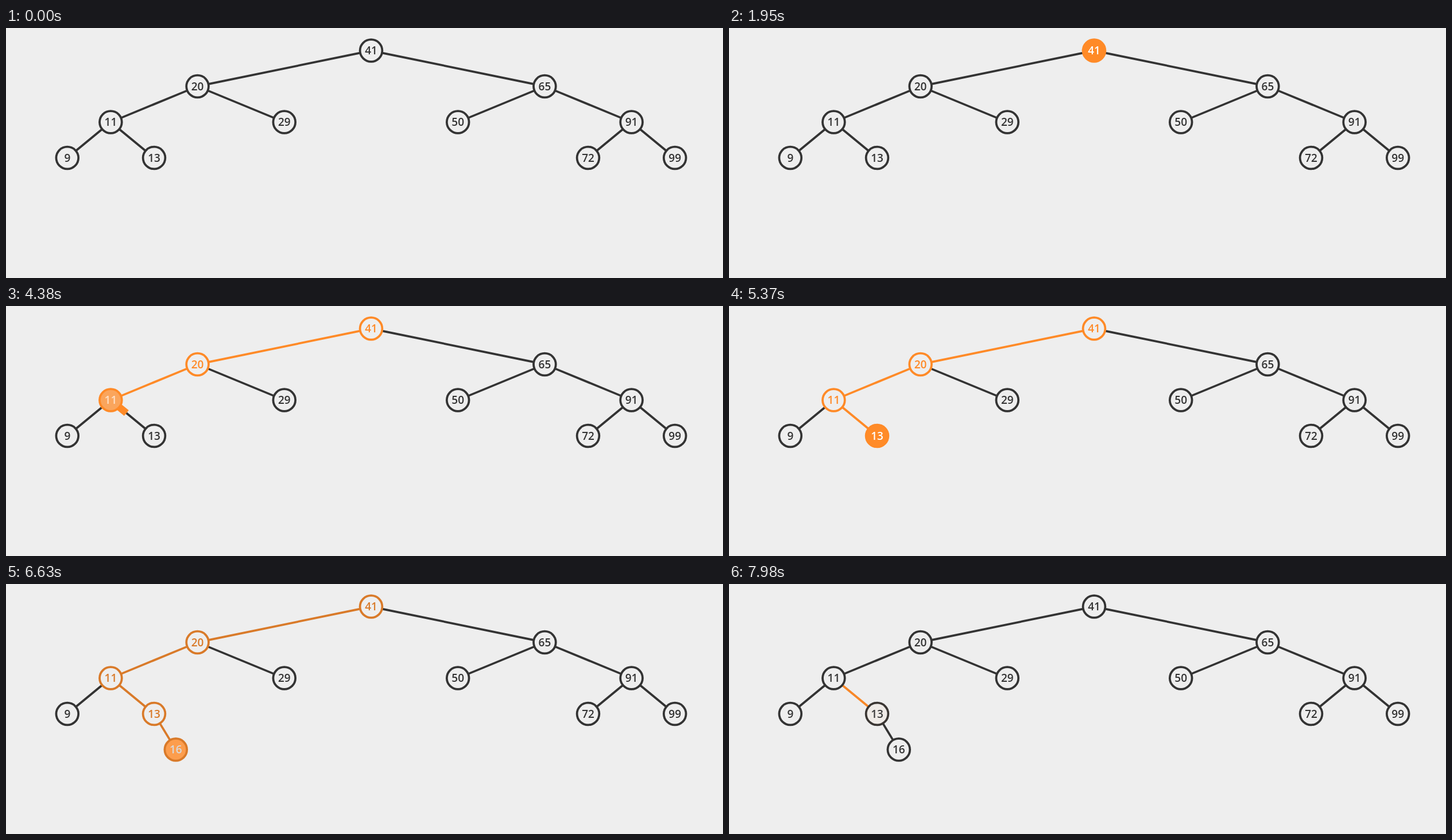
An HTML page that plays this animation: 1249x437 px, repeating every 8000 ms.

```html
<!DOCTYPE html>
<html lang="en">
<head>
<meta charset="utf-8">
<title>Binary search tree insertion</title>
<style>
  html, body { margin: 0; width: 100%; height: 100%; overflow: hidden; background: #eee; }
  svg { display: block; width: 100%; height: 100%; }
  text { font: 600 19px "Open Sans", "Noto Sans", sans-serif; text-anchor: middle; }
</style>
</head>
<body>
<svg viewBox="0 0 1249 437"></svg>
<script>
const LOOP = 8000, FIRST = 1342, STEP = 568, MOVE = 490;
const PAPER = [238, 238, 238], INK = [51, 51, 51], ORANGE = [255, 138, 39], WHITE = [255, 255, 255];
const RING = 21.25, DISC = 17.5, TRIM = 20, THIN = 3.75, THICK = 12.5;

const STYLES = {
  plain: { ring: INK, disc: PAPER, label: INK, size: 1 },
  trail: { ring: ORANGE, disc: PAPER, label: ORANGE, size: 1 },
  hot: { ring: ORANGE, disc: ORANGE, label: WHITE, size: 1 },
  hidden: { ring: ORANGE, disc: ORANGE, label: WHITE, size: 0 }
};

// value: [column, level, parent, style changes as [step, style]]
const TREE = {
  41: [0, 0, null, [[0, "hot"], [1, "trail"], [9, "plain"]]],
  20: [-4, 1, 41, [[2, "hot"], [3, "trail"], [9, "plain"]]],
  65: [4, 1, 41, []],
  11: [-6, 2, 20, [[4, "hot"], [5, "trail"], [9, "plain"]]],
  29: [-2, 2, 20, []],
  50: [2, 2, 65, []],
  91: [6, 2, 65, []],
  9: [-7, 3, 11, []],
  13: [-5, 3, 11, [[6, "hot"], [7, "trail"], [9, "plain"], [10, "hot"], [11, "plain"]]],
  72: [5, 3, 91, []],
  99: [7, 3, 91, []],
  16: [-4.5, 4, 13, [[8, "hot"], [9, "plain"]]]
};
const GROW_STEP = { 20: 1, 11: 3, 13: 5, 16: 7 };
const FADE_STEP = 9, RETURN_STEP = 11;

const svg = document.querySelector("svg");
const edgeLayer = add(svg, "g"), nodeLayer = add(svg, "g");

function add(parent, tag, attrs = {}) {
  const el = document.createElementNS("http://www.w3.org/2000/svg", tag);
  set(el, attrs);
  return parent.appendChild(el);
}
function set(el, attrs) {
  for (const key in attrs) el.setAttribute(key, attrs[key]);
}
const mix = (a, b, p) => a + (b - a) * p;
const blend = (a, b, p) => a.map((v, i) => mix(v, b[i], p));
const rgb = c => `rgb(${c.map(Math.round)})`;
const ease = t => t < 0.5 ? 4 * t ** 3 : 1 - 4 * (1 - t) ** 3;

function progress(time, step) {
  const t = (time - FIRST - step * STEP) / MOVE;
  return ease(Math.min(1, Math.max(0, t)));
}

const nodes = {}, edges = [];
for (const value in TREE) {
  const [column, level, , changes] = TREE[value];
  const g = add(nodeLayer, "g", {
    transform: `translate(${636 + column * 75.6} ${39.5 + level * 62.5})`
  });
  const scaler = add(g, "g");
  const label = add(scaler, "text", { y: 6.8 });
  label.textContent = value;
  nodes[value] = {
    x: 636 + column * 75.6, y: 39.5 + level * 62.5, changes, scaler, label,
    start: value === "16" ? "hidden" : "plain",
    ring: scaler.insertBefore(add(scaler, "circle", { r: RING }), label),
    disc: scaler.insertBefore(add(scaler, "circle", { r: DISC }), label)
  };
}
for (const value in TREE) {
  const from = nodes[TREE[value][2]], to = nodes[value];
  if (!from) continue;
  const dx = to.x - from.x, dy = to.y - from.y, k = TRIM / Math.hypot(dx, dy);
  const a = [from.x + dx * k, from.y + dy * k], b = [to.x - dx * k, to.y - dy * k];
  const ends = { x1: a[0], y1: a[1], x2: b[0], y2: b[1], "stroke-width": THIN };
  edges.push({
    value, a, b, grow: GROW_STEP[value],
    base: add(edgeLayer, "line", ends),
    sweep: add(edgeLayer, "line", { ...ends, stroke: rgb(ORANGE), "stroke-width": THICK })
  });
}

function drawNode(node, time) {
  let style = STYLES[node.start];
  for (const [step, name] of node.changes) {
    const p = progress(time, step), next = STYLES[name];
    if (p <= 0) break;
    style = {
      ring: blend(style.ring, next.ring, p),
      disc: blend(style.disc, next.disc, p),
      label: blend(style.label, next.label, p),
      size: mix(style.size, next.size, p)
    };
  }
  set(node.ring, { fill: rgb(style.ring) });
  set(node.disc, { fill: rgb(style.disc) });
  set(node.label, { fill: rgb(style.label) });
  set(node.scaler, { transform: `scale(${style.size})`, visibility: style.size ? "visible" : "hidden" });
}

function drawEdge({ value, a, b, grow, base, sweep }, time) {
  const p = grow ? progress(time, grow) : 0;
  const sweeping = p > 0 && p < 1;
  let color = p === 1 ? blend(ORANGE, INK, progress(time, FADE_STEP)) : INK;
  if (value === "13") color = blend(color, ORANGE, progress(time, RETURN_STEP));
  const shown = value !== "16" || p === 1;
  set(base, { stroke: rgb(color), visibility: shown ? "visible" : "hidden" });
  set(sweep, {
    x2: mix(a[0], b[0], p), y2: mix(a[1], b[1], p),
    visibility: sweeping ? "visible" : "hidden"
  });
}

function render(time) {
  for (const value in nodes) drawNode(nodes[value], time);
  for (const edge of edges) drawEdge(edge, time);
}

const origin = performance.now();
function tick() {
  render((performance.now() - origin) % LOOP);
  requestAnimationFrame(tick);
}
render(0);
requestAnimationFrame(tick);
</script>
</body>
</html>
```
